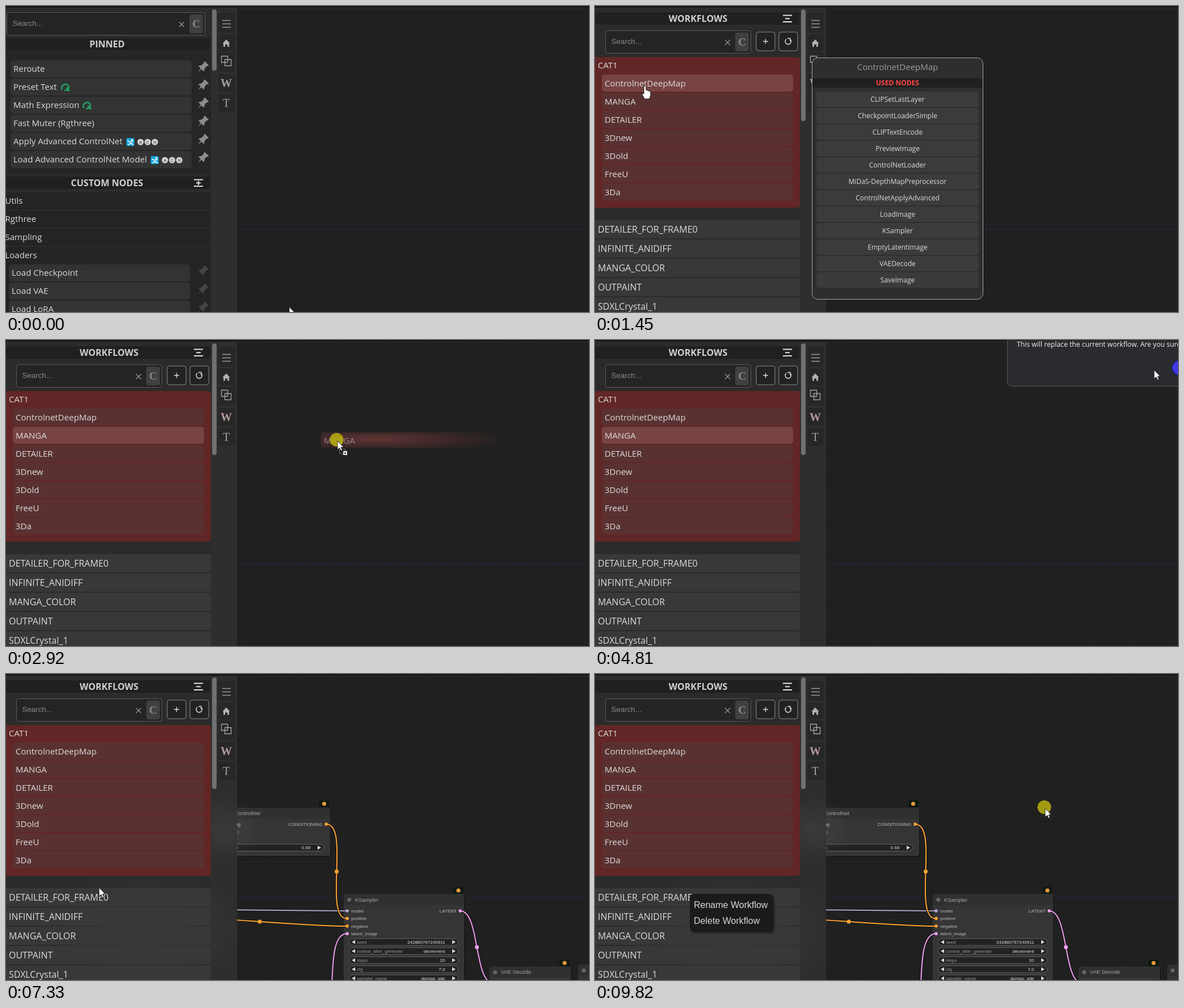
These frames come from a looping animation (1027x540 px, 9.9 s). An HTML page:

```html
<!DOCTYPE html>
<html lang="en">
<head>
<meta charset="utf-8">
<title>Workflow sidebar</title>
<style>
html, body { margin: 0; width: 100%; height: 100%; overflow: hidden; background: #212121; }
svg { display: block; width: 1027px; height: 540px; }
text { font-family: "Open Sans", "Noto Sans", sans-serif; white-space: pre; }
.arial { font-family: "Liberation Sans", Arial, sans-serif; }
.serif { font-family: "Liberation Serif", "Times New Roman", serif; }
</style>
</head>
<body>
<svg id="stage" viewBox="0 0 1027 540" xmlns="http://www.w3.org/2000/svg"></svg>
<script>
const LOOP = 9900;
const MID = 'text-anchor="middle"', END = 'text-anchor="end"', BOLD = 'font-weight="700"';
const ARIAL = 'class="arial"', SERIF = 'class="serif"';

// Drawing helpers
const rect = (x, y, w, h, fill, r = 0, more = '') =>
  `<rect x="${x}" y="${y}" width="${w}" height="${h}" rx="${r}" fill="${fill}" ${more}/>`;
const frame = (x, y, w, h, fill, stroke, r) =>
  rect(x + .5, y + .5, w - 1, h - 1, fill, r, `stroke="${stroke}"`);
const dot = (x, y, r, fill) => `<circle cx="${x}" cy="${y}" r="${r}" fill="${fill}"/>`;
const line = (d, color, w = 1, more = '') =>
  `<path d="${d}" fill="none" stroke="${color}" stroke-width="${w}" ${more}/>`;
const shape = (d, fill, more = '') => `<path d="${d}" fill="${fill}" ${more}/>`;
const at = (x, y, body) => `<g transform="translate(${x} ${y})">${body}</g>`;
const group = (id, body) => `<g id="${id}" visibility="hidden">${body}</g>`;
// y is the middle of the capital letters
const text = (x, y, s, size, fill = '#dcdcdc', more = '') =>
  `<text x="${x}" y="${y + size * .36}" font-size="${size}" fill="${fill}" ${more}>${s}</text>`;
const each = (list, fn) => list.map(fn).join('');

function grid() {
  let minor = '', major = '';
  for (let i = -60; i < 95; i++) {
    const x = 395 + i * 6.73, y = 394.5 + i * 6.71;
    const v = x > 407 ? `M${x.toFixed(1)} 4V540` : '';
    const h = y > 4 && y < 540 ? `M407 ${y.toFixed(1)}H1027` : '';
    if (i % 10) minor += v + h; else major += v + h;
  }
  return rect(0, 0, 1027, 540, '#212121') + line(minor, '#1f1f1f') + line(major, '#1c1c1c') +
    line('M407 394.5H1027', '#24264a');
}

// Sidebar parts
const heading = (y, s, x = 178) => rect(0, y - 11, 360, 22, '#202020', 3) +
  text(x, y, s, 16, '#d0d0d0', `${MID} ${BOLD}`);
const scrollbar = h => rect(363, 6, 8, h, '#707070', 4);
const button = (x, icon) => frame(x, 45.5, 34, 34, '#222', '#8a8a8a', 4) + at(x + 17, 62.5, icon);
const searchBox = (x, y, w) => frame(x, y, w, 41, '#242424', '#5a5a5a', 4) +
  text(x + 10.5, y + 19.5, 'Search...', 13.33, '#8a8a8a', ARIAL) +
  at(x + w - 46, y + 17, line('M0 0l9 9m0-9l-9 9', '#999', 1.2)) +
  rect(x + w - 28, y + 4, 24, 33, '#404040', 4) +
  text(x + w - 16, y + 20.5, 'C', 19, '#8a8a8a', `${MID} ${SERIF} ${BOLD}`);
const pin = (y, color) => shape('M-5-10H5V-7H3.5L4-1L7 4H1L0 12L-1 4H-7L-4-1L-3.5-7H-5Z',
  color, `transform="translate(346.5 ${y - 3}) rotate(45)"`);
const nodeRow = (x, y, s, color) => rect(x, y - 15, 319, 30, '#333', 5) + text(x + 5, y, s, 15) + pin(y, color);
const swirl = (x, y) => at(x, y, line('M-7 4a6 6 0 0 1 3-9a5.5 5.5 0 1 1 4 10h-3M6 6l-6-6', '#1fa463', 2.6));
const blueBadge = (x, y) => at(x, y, rect(-7, -7, 14, 14, '#12a5dc', 2) + dot(3, -3.5, 1.7, '#fff') +
  line('M-5-2l4 2l6-1M-4 5l5-3l4 3', '#fff', 1.6) +
  each(['A', 'C', 'N'], (c, i) => at(18 + i * 12.6, 0, dot(0, 0, 5.6, '#d4d4d4') +
    text(0, 0, c, 7.5, '#333', `${MID} ${ARIAL}`))));

function pinnedList() {
  const names = ['Reroute', 'Preset Text', 'Math Expression', 'Fast Muter (Rgthree)',
    'Apply Advanced ControlNet', 'Load Advanced ControlNet Model'];
  return heading(67.5, 'PINNED') + rect(0, 80, 361, 216, '#262626', 3) +
    each(names, (s, i) => nodeRow(8, 111 + i * 32, s, '#8d8d8d')) +
    swirl(106, 144) + swirl(144, 176) + blueBadge(219, 240) + blueBadge(262, 272);
}

function customList() {
  return heading(312, 'CUSTOM NODES') +
    at(339, 312, line('M-8-5.5H8M-8 6H8M-4 .3H4M0-3.5V4', '#ddd', 2)) +
    each(['Utils', 'Rgthree', 'Sampling', 'Loaders'], (s, i) =>
      rect(-4, 329 + i * 32, 365, i < 3 ? 30 : 130, '#242424', 4) + text(-1.5, 343.5 + i * 32, s, 15)) +
    each(['Load Checkpoint', 'Load VAE', 'Load LoRA'], (s, i) => nodeRow(5, 471 + i * 32, s, '#444'));
}

const homePanel = () => rect(0, 4, 361, 536, '#2b2b2b') + searchBox(1, 11, 350) +
  pinnedList() + customList() + scrollbar(108);

const haze = (x, y, rx, ry) => `<ellipse cx="${x}" cy="${y}" rx="${rx}" ry="${ry}" fill="url(#haze)"/>`;

function workflowList() {
  const inner = ['ControlnetDeepMap', 'MANGA', 'DETAILER', '3Dnew', '3Dold', 'FreeU', '3Da'];
  const outer = ['DETAILER_FOR_FRAME0', 'INFINITE_ANIDIFF', 'MANGA_COLOR', 'OUTPAINT', 'SDXLCrystal_1'];
  return rect(-4, 90, 365, 266, '#622626', 5) + text(5, 104.5, 'CAT1', 15) +
    each(inner, (s, i) => rect(12, 121 + i * 32, 337, 30, '#5a3131', 5, `id="item${i}"`) +
      text(17, 136.5 + i * 32, s, 15)) +
    each(outer, (s, i) => rect(-4, 378 + i * 34, 365, 32, '#383838', 4, `id="row${i}"`) +
      text(5, 394.5 + i * 34, s, 16));
}

const workflowPanel = () => rect(0, 4, 361, 536, '#2b2b2b') +
  group('glow', haze(385, 275, 65, 60) + haze(240, 450, 190, 110)) +
  heading(22, 'WORKFLOWS', 181.5) + at(339, 22, line('M-8-5.5H8M-4 .3H4M-8 6H8', '#e4e4e4', 2)) +
  searchBox(18, 43, 257) + button(283.5, line('M-4.5 0h9m-4.5-4.5v9', '#ddd', 1.3)) +
  button(323.5, line('M3-4a5.2 5.2 0 1 1-6.5 0M-1.5-5.2h4.8v4.6', '#ddd', 1.5)) +
  workflowList() + scrollbar(197);

const iconStrip = () => rect(0, 4, 407, 536, '#2e2e2e') +
  each([[12, 35], [50, 30], [82, 34], [120, 32], [155, 32]], ([y, h]) => rect(374, y, 29, h, '#272727', 4)) +
  at(388, 31.5, line('M-7-6H8M-7 0H8M-7 6H8', '#9a9a9a', 1.3)) +
  at(388, 66, shape('M0-7L6.5 0H5V6H2V2H-2V6H-5V0H-6.5Z', '#b0b0b0')) +
  at(379.5, 88.5, line('M0 0h11v11h-11zM6 6h11v11h-11z', '#a5a5a5', 1.3)) +
  text(388, 135.5, 'W', 20, '#a0a0a0', `id="tabW" ${MID} ${SERIF} ${BOLD}`) +
  text(388, 171, 'T', 20, '#a0a0a0', `${MID} ${SERIF}`);

const popup = (id, top, title, nodes) => group(id,
  frame(382, top, 302, 79 + nodes.length * 29, '#2e2e2e', '#a5a5a5', 10) +
  text(533, top + 16.5, title, 15, '#9c9c9c', MID) + rect(383, top + 36, 300, 17, '#202020') +
  text(533, top + 44.5, 'USED NODES', 12, '#ff4444', `${MID} ${BOLD}`) +
  each(nodes, (s, i) => rect(390, top + 60 + i * 29, 286, 27, '#3b3b3b', 4) +
    text(533, top + 73.5 + i * 29, s, 12, '#dcdcdc', MID)));

// Node graph
const ORANGE = '#ffa431', PINK = '#f3a0f0', LILAC = '#b3a4cd';
const small = (x, y, s, color = '#bbb', more = '') => text(x, y, s, 8.05, color, `${ARIAL} ${more}`);
const title = (x, y, s, more = '') => text(x, y, s, 9.4, '#a4a4a4', `${ARIAL} ${more}`);
const badge = (x, y) => at(x, y, rect(-9, -6, 18, 12, '#0f1a12', 2) + dot(0, 0, 3.6, '#e79a3c'));
const nodeBox = (x, y, w, h) => rect(x + 2, y + 2, w, h, '#191919', 4) + rect(x, y, w, h, '#353535', 4) +
  rect(x, y, w, 20, '#303030', 4) + dot(x + 9.7, y + 10.3, 3.5, '#666');

// A wire bends by a quarter of its length and has a dot halfway
function wire(x1, y1, x2, y2, color) {
  const bend = Math.hypot(x2 - x1, y2 - y1) / 4;
  const d = `M${x1} ${y1}C${x1 + bend} ${y1} ${x2 - bend} ${y2} ${x2} ${y2}`;
  return line(d, '#151515', 4) + line(d, color, 2) + dot((x1 + x2) / 2, (y1 + y2) / 2, 3.5, color);
}

const widget = (x, y, w, label, value) => frame(x, y - 6.5, w, 13, '#222', '#606060', 6.5) +
  at(x + 5, y, shape('M0 0l6-3.5v7z', '#d8d8d8')) + at(x + w - 5, y, shape('M0 0l-6-3.5v7z', '#d8d8d8')) +
  small(x + 14, y, label, '#999') + small(x + w - 23.5, y, value, '#e2e2e2', END);

const controlNode = () => nodeBox(340, 236, 231, 85) + title(448, 246, 'Apply ControlNet', END) +
  small(413, 265, 'conditioning', '#bbb', END) + small(411, 279, 'control_net', '#777', END) +
  small(557, 265, 'CONDITIONING', '#bbb', END) + widget(350, 306.5, 210, 'strength', '0.68') +
  small(409, 306.5, 'h', '#999', END) + badge(560.5, 229);

function samplerNode() {
  const inputs = [['model', LILAC], ['positive', ORANGE], ['negative', ORANGE], ['latent_image', PINK]];
  const fields = [['seed', '242880787240911'], ['control_after_generate', 'decrement'], ['steps', '20'],
    ['cfg', '7.0'], ['sampler_name', 'dpmpp_sde']];
  return title(615, 399, 'KSampler') + small(794, 418, 'LATENT', '#bbb', END) +
    each(inputs, ([s, c], i) => dot(601, 418 + i * 13.4, 2.8, c) + small(608, 418 + i * 13.4, s)) +
    each(fields, ([a, b], i) => widget(604, 473 + i * 16, 193, a, b));
}

const wires = () => wire(150, 414, 601, 418, LILAC) + wire(293, 429, 601, 445, ORANGE) +
  wire(564, 265, 601, 432, ORANGE) + wire(547, 640, 601, 458, PINK) + wire(800, 418, 859, 546, PINK);

const graph = () => controlNode() + nodeBox(595, 388, 212, 160) + badge(797, 382) + wires() + samplerNode() +
  rect(561.5, 262.5, 5, 5, ORANGE) + dot(800, 418, 2.7, PINK) +
  nodeBox(852, 516, 143, 40) + title(872, 526, 'VAE Decode') + badge(984, 510) + nodeBox(1008, 513, 60, 40);

const dialog = frame(726, -30, 420, 112, '#2a2b2e', '#55565a', 8) +
  text(743, 8, 'This will replace the current workflow. Are you sure?', 12.2, '#f0f0f0') +
  rect(1015.5, 34.5, 70, 29, '#1d1f66', 14.5) + rect(1017.5, 36.5, 70, 25, '#4338e8', 12.5);

const menu = rect(168, 390, 149, 68, '#000', 8, 'opacity=".3"') + rect(167, 388, 147, 67, '#1b1b1b', 8) +
  each(['Rename Workflow', 'Delete Workflow'], (s, i) => text(174, 407.5 + i * 28, s, 16, '#d8d8d8', ARIAL));

const ghost = rect(-29, -15, 335, 27, 'url(#fade)') + text(-24, -.5, 'MANGA', 15, '#ddd', 'opacity=".5"');
const press = dot(-1.5, -2, 12, 'rgba(190,180,12,.82)');
const arrow = shape('M0 0V15.5L3.6 12.2L6.1 17.6L8.4 16.6L6 11.3H10.6Z', '#fff', 'stroke="#111" stroke-width=".8"');
const hand = shape('M-2 1Q0-1 2 1V7L10 10V17L8 23H-1L-6 13L-2 14Z', '#fff', 'stroke="#111" stroke-linejoin="round"');
const carry = frame(3, 14, 11, 9, 'none', '#ddd" stroke-dasharray="1 1.5', 0) + rect(10, 18, 7, 7, '#eee') +
  line('M11.5 21.5h4m-2-2v4', '#222');

const deepNodes = ['CLIPSetLastLayer', 'CheckpointLoaderSimple', 'CLIPTextEncode', 'PreviewImage', 'ControlNetLoader',
  'MiDaS-DepthMapPreprocessor', 'ControlNetApplyAdvanced', 'LoadImage', 'KSampler', 'EmptyLatentImage', 'VAEDecode', 'SaveImage'];
const mangaNodes = deepNodes.filter(s => s !== 'PreviewImage');

const defs = `<defs>
  <radialGradient id="fade" gradientUnits="userSpaceOnUse" cx="0" cy="0" r="1" gradientTransform="translate(70 -3) scale(240 26)">
    <stop offset="0" stop-color="#743a3a" stop-opacity=".8"/><stop offset=".5" stop-color="#5c3030" stop-opacity=".5"/>
    <stop offset="1" stop-color="#502a2a" stop-opacity="0"/></radialGradient>
  <radialGradient id="haze"><stop offset="0" stop-color="#fff" stop-opacity=".06"/><stop offset="1" stop-color="#fff" stop-opacity="0"/></radialGradient>
  </defs>`;
const el = id => document.getElementById(id);
el('stage').innerHTML = defs + grid() + group('graph', graph()) + iconStrip() +
  group('home', homePanel()) + group('flows', workflowPanel()) +
  rect(0, 0, 1027, 3, '#171717') + rect(0, 3, 1027, 1, '#333') +
  popup('popDeep', 91, 'ControlnetDeepMap', deepNodes) + popup('popManga', 123, 'MANGA', mangaNodes) +
  popup('popFrame', 349, 'DETAILER_FOR_FRAME0', mangaNodes) + group('dialog', dialog) + group('menu', menu) +
  `<g id="pointer">${group('ghost', ghost) + group('press', press) + group('arrow', arrow) +
    group('hand', hand) + group('carry', carry)}</g>`;

// Pointer moves: start, end, number of steps, then stops as step, x, y
const moves = [];
const move = (from, to, n, ...stops) => moves.push({ from, to, n, stops });
move(60, 920, 12, [8, 395, 165], [10, 388, 137]);
move(1120, 1720, 10, [3, 238, 151], [6, 88, 141], [10, 41, 169]);
move(1920, 2310, 7, [7, 122, 166]);
move(2510, 2920, 7, [3, 330, 163], [7, 584, 178]);
move(4320, 5270, 13, [1, 579, 177], [7, 985, 53], [13, 1014, 53]);
move(5820, 5980, 3, [3, 986, 63]);
move(6290, 7250, 13, [13, 157, 350]);
move(7330, 7410, 2, [1, 164, 377], [2, 168, 389]);
move(7930, 8880, 13, [8, 240, 434], [13, 179, 463]);
move(8960, 9820, 12, [11, 793, 237]);

function pointerAt(t) {
  let x = 499, y = 531;
  for (const { from, to, n, stops } of moves) {
    if (t < from) break;
    const step = Math.min(n, Math.floor((t - from) / (to - from) * (n - 1) + .1) + 1);
    let last = 0;
    for (const [k, sx, sy] of stops) {
      const u = Math.min(1, (step - last) / (k - last));
      x += (sx - x) * u;
      y += (sy - y) * u;
      if (step <= k) break;
      last = k;
    }
  }
  return [x, y];
}

const show = (id, on) => el(id).setAttribute('visibility', on ? 'visible' : 'hidden');
const paint = (id, color) => el(id).setAttribute('fill', color);

function draw(t) {
  const during = (a, b) => t >= a && t < b;
  const flows = t >= 842, loaded = t >= 5430;
  const deep = during(1180, 1585), manga = during(1585, 5350), row = during(7405, 8080);
  const drag = during(2050, 3780);
  const hover = during(760, 2050) || during(5110, 5350) || row;
  show('home', !flows);
  show('flows', flows);
  show('graph', loaded);
  show('glow', loaded);
  show('popDeep', deep);
  show('popManga', during(1585, 2050));
  show('popFrame', row);
  show('dialog', during(3855, 5350));
  show('menu', t >= 7635);
  show('ghost', drag);
  show('carry', drag);
  show('hand', hover);
  show('arrow', !hover);
  show('press', during(765, 915) || during(1920, 3780) || during(5265, 5350) || during(7560, 7640) || t >= 9815);
  paint('item0', deep ? '#774343' : '#5a3131');
  paint('item1', manga ? '#774343' : '#5a3131');
  paint('row0', row ? '#4a4a4a' : '#383838');
  paint('tabW', flows ? '#b59a9a' : '#a0a0a0');
  const [x, y] = pointerAt(t);
  el('pointer').setAttribute('transform', `translate(${x.toFixed(1)} ${y.toFixed(1)})`);
}

function tick() {
  draw(performance.now() % LOOP);
  requestAnimationFrame(tick);
}
tick();
</script>
</body>
</html>
```
